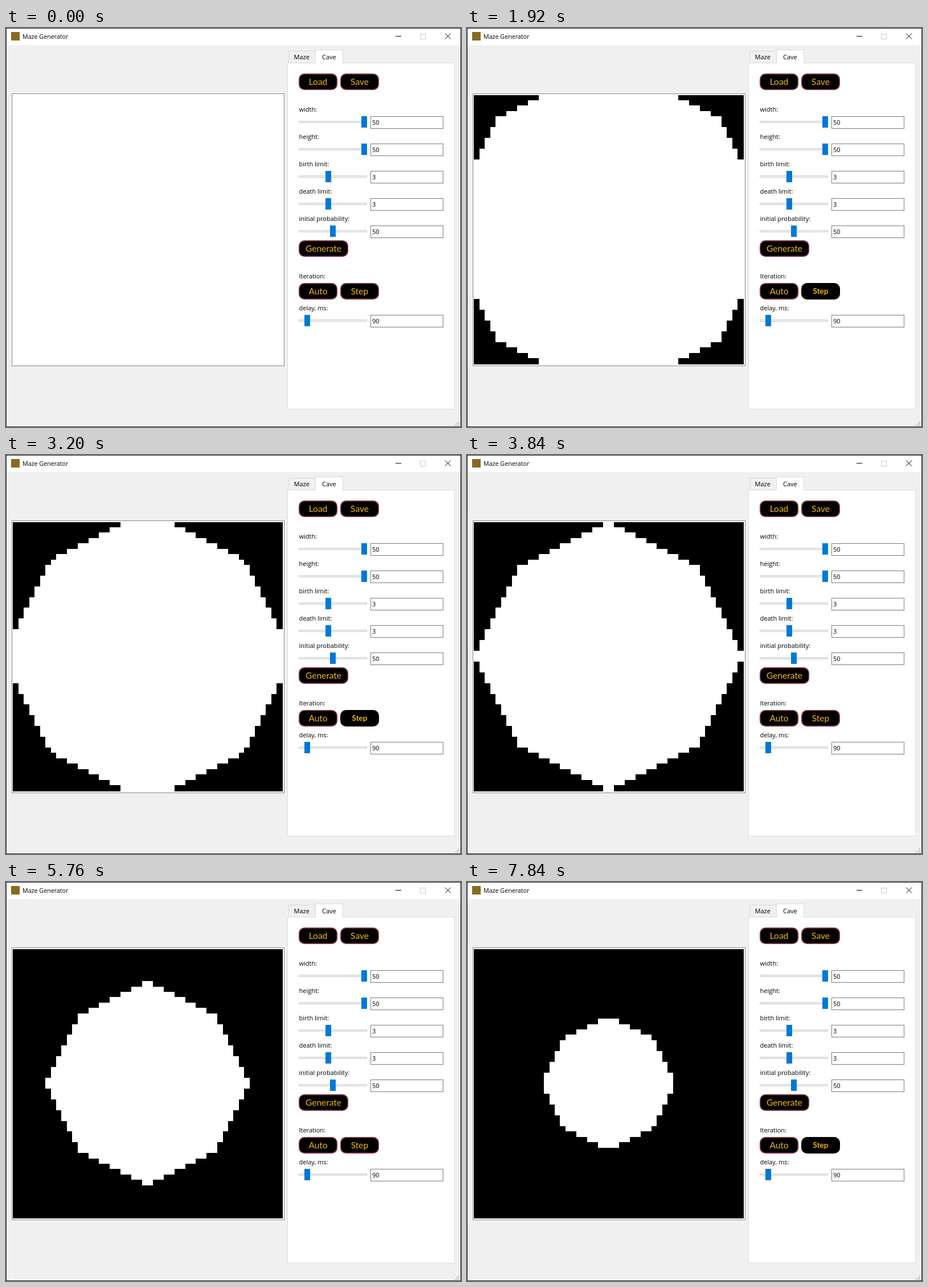
An HTML page with a canvas that plays this animation: 799 by 701 pixels, repeating every 8 s.

```html
<!DOCTYPE html>
<html lang="en">
<head>
<meta charset="utf-8">
<title>Maze Generator</title>
<style>
  html, body { margin: 0; width: 100%; height: 100%; overflow: hidden; background: #f0f0f0; }
  canvas { display: block; width: 799px; height: 701px; }
</style>
</head>
<body>
<canvas id="stage" width="799" height="701"></canvas>
<script>
const ctx = document.getElementById('stage').getContext('2d');
const N = 50, STEP_MS = 160, STEPS = 50;
const BIRTH = 3, DEATH = 3;
const UI = '"Open Sans", "Noto Sans", sans-serif';
const CASUAL = 'Lato, "Open Sans", sans-serif';

// Cave automaton: everything outside the grid counts as wall.
const isWall = (g, x, y) => x < 0 || y < 0 || x >= N || y >= N || g[y * N + x] === 1;

function evolve(g) {
  return g.map((cell, i) => {
    const x = i % N, y = (i - x) / N;
    let walls = 0;
    for (let dy = -1; dy <= 1; dy++)
      for (let dx = -1; dx <= 1; dx++)
        if ((dx || dy) && isWall(g, x + dx, y + dy)) walls++;
    return cell ? +(walls >= DEATH) : +(walls > BIRTH);
  });
}

const generations = [new Uint8Array(N * N)];
while (generations.length < STEPS) generations.push(evolve(generations[generations.length - 1]));

function rect(x, y, w, h, color) {
  ctx.fillStyle = color;
  ctx.fillRect(x, y, w, h);
}

function box(x, y, w, h, fill, border) {
  rect(x, y, w, h, border);
  rect(x + 1, y + 1, w - 2, h - 2, fill);
}

function text(str, x, y, font = '11px ' + UI, color = '#000', align = 'left') {
  ctx.font = font;
  ctx.fillStyle = color;
  ctx.textAlign = align;
  ctx.fillText(str, x, y);
}

function line(x1, y1, x2, y2, color) {
  ctx.strokeStyle = color;
  ctx.lineWidth = 1;
  ctx.beginPath();
  ctx.moveTo(x1, y1);
  ctx.lineTo(x2, y2);
  ctx.stroke();
}

function button(label, x, y, w, pressed) {
  ctx.beginPath();
  ctx.roundRect(x, y, w, 29, 10);
  ctx.fillStyle = pressed ? '#000' : '#742c39';
  ctx.fill();
  ctx.beginPath();
  ctx.roundRect(x + 2, y + 2, w - 4, 25, 8);
  ctx.fillStyle = '#000';
  ctx.fill();
  const font = (pressed ? 'bold 13.5px ' : '15.5px ') + CASUAL;
  text(label, x + w / 2, y + (pressed ? 19 : 20), font, '#f3b70c', 'center');
}

function slider(label, value, y, handleX) {
  text(label, 514.5, y - 8);
  box(514, y + 8, 120, 4, '#e7eaea', '#d6d6d6');
  rect(handleX, y, 10, 20, '#0078d7');
  box(640, y, 128, 22, '#fff', '#7a7a7a');
  text(value, 643, y + 15);
}

function drawWindow() {
  rect(0, 0, 799, 701, '#2b2b2b');
  rect(1, 1, 797, 699, '#f0f0f0');
  rect(1, 1, 797, 29, '#fff');
  rect(9, 7, 15, 15, '#8a6a22');
  text('Maze Generator', 29, 19, '10.7px ' + UI);

  rect(684, 14, 10, 1, '#000');
  box(727, 10, 10, 10, '#fff', '#ccc');
  line(771, 9.5, 781, 19.5, '#000');
  line(781, 9.5, 771, 19.5, '#000');

  for (let row = 0; row < 3; row++)
    for (let col = 0; col <= row; col++)
      rect(794 - col * 3, 691 + row * 3, 2, 2, '#bfbfbf');
}

function drawTabs() {
  box(494, 61, 294, 609, '#fff', '#dcdcdc');
  box(496, 40, 48, 22, '#f0f0f0', '#d9d9d9');
  box(543, 38, 49, 24, '#fff', '#d9d9d9');
  rect(544, 60, 47, 3, '#fff');
  text('Maze', 505.5, 55);
  text('Cave', 555, 55);
}

function drawControls(stepPressed) {
  button('Load', 514, 80, 68);
  button('Save', 587, 80, 68);
  slider('width:', '50', 155, 624);
  slider('height:', '50', 203, 624);
  slider('birth limit:', '3', 251, 561);
  slider('death limit:', '3', 299, 561);
  slider('initial probability:', '50', 347, 569);
  button('Generate', 514, 373, 87);
  text('Iteration:', 514.5, 440);
  button('Auto', 514, 448, 68);
  button('Step', 587, 448, 68, stepPressed);
  slider('delay, ms:', '90', 504, 524);
}

const edge = (origin, i) => i === N ? origin + 474 : Math.round(origin + 0.45 + 9.44 * i);
const edgeX = i => edge(12, i);
const edgeY = i => i === 0 ? 118 : edge(117, i);

function drawCave(g) {
  box(10, 115, 479, 479, '#fff', '#828790');
  for (let y = 0; y < N; y++)
    for (let x = 0; x < N; x++)
      if (g[y * N + x])
        rect(edgeX(x), edgeY(y), edgeX(x + 1) - edgeX(x), edgeY(y + 1) - edgeY(y), '#000');
}

const isPressed = step => (step >= 1 && step <= 20) || step >= 46;

let shown = -1;
function tick(now) {
  const step = Math.floor(now / STEP_MS) % STEPS;
  if (step !== shown) {
    shown = step;
    drawWindow();
    drawTabs();
    drawControls(isPressed(step));
    drawCave(generations[step]);
  }
}

const start = performance.now();
function loop() {
  tick(performance.now() - start);
  requestAnimationFrame(loop);
}
loop();
</script>
</body>
</html>
```
